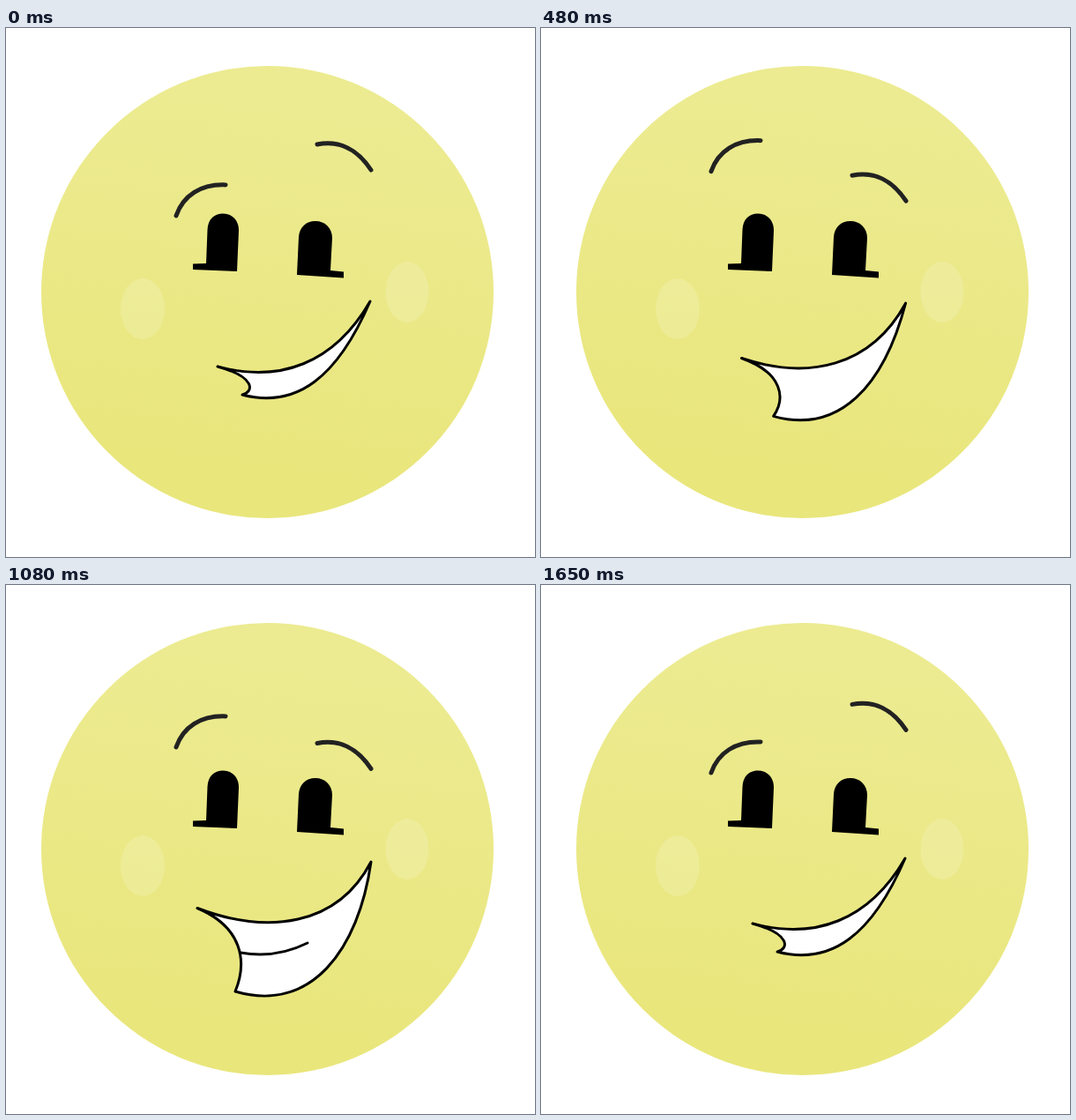
An HTML page for the animation above (1.68 s loop, 600x600 px).

```html
<!DOCTYPE html>
<html lang="en">
<head>
<meta charset="utf-8">
<title>Smiling face</title>
<style>
  html, body { margin: 0; width: 100%; height: 100%; overflow: hidden; background: #fff; }
  svg { display: block; width: 100%; height: 100%; }
  .line { fill: none; stroke-linecap: round; stroke-linejoin: round; }
</style>
</head>
<body>
<svg viewBox="0 0 600 600">
  <defs>
    <linearGradient id="skin" x1="0.57" y1="0" x2="0.43" y2="1">
      <stop offset="0.1" stop-color="#eceb91"/>
      <stop offset="0.9" stop-color="#e9e67c"/>
    </linearGradient>
  </defs>
  <circle cx="296.5" cy="299.5" r="256.5" fill="url(#skin)"/>
  <g fill="#fff" opacity="0.15">
    <ellipse cx="155" cy="318.5" rx="25" ry="34.5"/>
    <ellipse cx="455" cy="299.5" rx="24.5" ry="34.5"/>
  </g>
  <path d="M212 267.5L227 267L228.5 229C229 217 236 210.5 246 210.5C257 210.5 264.5 219 264 230L262 276L212 274Z"/>
  <path id="eye"/>
  <g class="line" stroke="#222" stroke-width="5">
    <path id="leftBrow" d="M193 213C201 190 221 177 249 178"/>
    <path id="rightBrow" d="M353 132C378 127 399 138 414 161"/>
  </g>
  <g class="line" stroke="#000" stroke-width="3">
    <path id="mouth" fill="#fff"/>
    <path id="teeth" d="M266 417C294 422 318 418 342 406"/>
  </g>
</svg>
<script>
const LOOP = 1680;
const part = id => document.getElementById(id);
const [eye, leftBrow, rightBrow, mouth, teeth] =
  ['eye', 'leftBrow', 'rightBrow', 'mouth', 'teeth'].map(part);

const smirk = 'M240 384C310 403 372 381 413 310C376 396 330 432 268 416C281 413 284 396 240 384Z';
const grin = 'M217 366.5C297 397 376 387 414 314C400 414 346 486 260 461C274 427 268 388 217 366.5Z';
const openEye = 'M330 280L332 237C333 226 340 219 351 219C362 219 370 227 370 238L368 275L383 276.5L383 283.5Z';
const squint = 'M330 278L331.5 245C331.5 237 338 232 347 232C357 231 364 236 366 245L370 269L383.5 271L383 277Z';

// Each track is a list of [time, value] keys joined by straight lines.
const tracks = {
  leftBrow: [[0, 0], [573, -60], [1560, 0], [LOOP, 0]],
  rightBrow: [[0, 0], [122, 0], [724, 59], [977, 59], [1418, 10], [LOOP, 2.6]],
  mouth: [[0, 0], [275, 0], [655, 1], [1257, 1], [1650, 0], [LOOP, 0]],
  eye: [[0, 0], [650, 0], [810, 1], [970, 0], [LOOP, 0]]
};

function valueAt(keys, t) {
  const i = keys.findIndex(key => key[0] > t);
  const [t0, v0] = keys[i - 1], [t1, v1] = keys[i];
  return v0 + (v1 - v0) * (t - t0) / (t1 - t0);
}

function morph(from, to, amount) {
  const numbers = to.match(/[\d.]+/g);
  let i = 0;
  return from.replace(/[\d.]+/g, n => +n + (numbers[i++] - n) * amount);
}

function draw() {
  const t = performance.now() % LOOP;
  const at = name => valueAt(tracks[name], t);
  const smile = at('mouth');
  leftBrow.setAttribute('transform', `translate(0 ${at('leftBrow')})`);
  rightBrow.setAttribute('transform', `translate(0 ${at('rightBrow')})`);
  mouth.setAttribute('d', morph(smirk, grin, smile));
  eye.setAttribute('d', morph(openEye, squint, at('eye')));
  teeth.setAttribute('visibility', smile === 1 ? 'visible' : 'hidden');
  requestAnimationFrame(draw);
}
draw();
</script>
</body>
</html>
```
